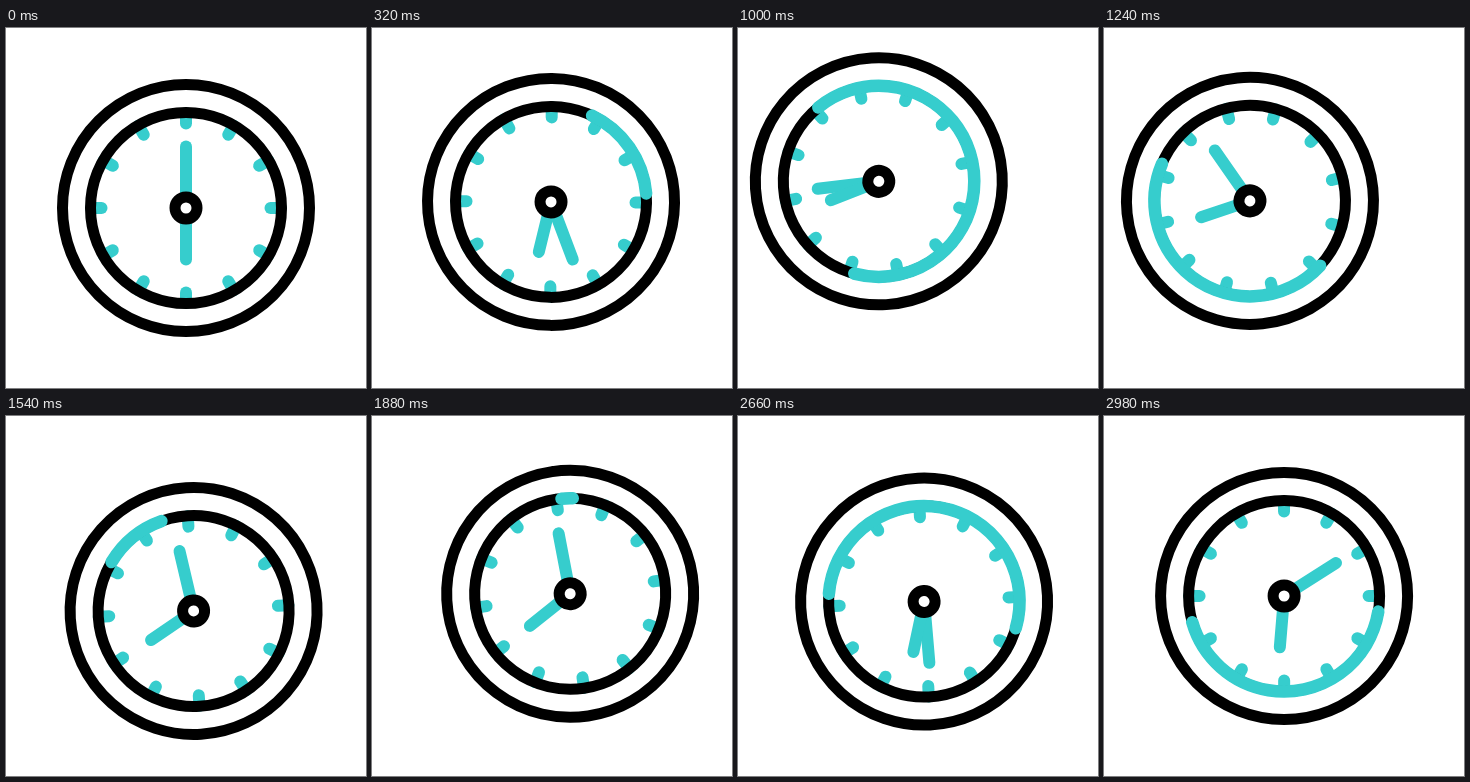
An HTML page with a canvas that plays this animation: 360x360 px, repeating every 3000 ms.

```html
<!DOCTYPE html>
<html lang="en">
<head>
<meta charset="utf-8">
<title>Clock</title>
<style>
  html, body { margin: 0; width: 100%; height: 100%; overflow: hidden; background: #fff; }
  canvas { display: block; width: 360px; height: 360px; }
</style>
</head>
<body>
<canvas id="stage" width="360" height="360"></canvas>
<script>
const ctx = document.getElementById('stage').getContext('2d');
const LOOP = 3000, STEP = 20, PHASE = 1800;
const TEAL = '#36cdcd', BLACK = '#000';
const RAD = Math.PI / 180, TURNS = 720;

const clamp = u => Math.min(1, Math.max(0, u));
const smooth = u => u * u * (3 - 2 * u);

// Timing curve cubic-bezier(x1, 0, x2, 1).
function ease(x1, x2) {
  return u => {
    let lo = 0, hi = 1;
    for (let i = 0; i < 24; i++) {
      const p = (lo + hi) / 2, q = 1 - p;
      if (3 * q * q * p * x1 + 3 * q * p * p * x2 + p * p * p < u) lo = p;
      else hi = p;
    }
    return smooth(lo);
  };
}

// Swing that rests at each [time, offset] turning point.
function swing(...keys) {
  return t => {
    let v = 0;
    keys.forEach(([time, offset], i) => {
      const [t0, v0] = keys[i - 1] || [0, 0];
      v += (offset - v0) * smooth(clamp((t - t0) / (time - t0)));
    });
    return v;
  };
}

const swayX = swing([240, 0], [1110, -41], [1750, 24], [2290, -16], [2710, 7], [3000, 0]);
const swayY = swing([30, 0], [970, -27], [1530, 15], [2050, -8], [2520, 8], [2900, 0]);

// The hands wind forward, then back; the highlight sweeps forward both times.
const phases = [
  { hand: ease(0.23, 0.25), head: ease(0.31, 0.42), tail: ease(0.58, 0.69) },
  { hand: ease(0.46, 0.16), head: ease(0.21, 0.46), tail: ease(0.38, 0.78) }
];

function arc(r, color, width, from = 0, to = 360) {
  ctx.strokeStyle = color;
  ctx.lineWidth = width;
  ctx.beginPath();
  ctx.arc(0, 0, r, (from - 90) * RAD, (to - 90) * RAD);
  ctx.stroke();
}

function spoke(deg, from, to) {
  const s = Math.sin(deg * RAD), c = -Math.cos(deg * RAD);
  ctx.strokeStyle = TEAL;
  ctx.lineWidth = 12;
  ctx.beginPath();
  ctx.moveTo(s * from, c * from);
  ctx.lineTo(s * to, c * to);
  ctx.stroke();
}

function draw(t) {
  const back = t >= PHASE;
  const { hand, head, tail } = phases[back ? 1 : 0];
  const u = (t % PHASE) / PHASE;
  const minute = TURNS * (back ? 1 - hand(u) : hand(u));
  const from = TURNS * tail(u), to = TURNS * head(u);
  const dx = swayX(t);

  ctx.setTransform(1, 0, 0, 1, 0, 0);
  ctx.fillStyle = '#fff';
  ctx.fillRect(0, 0, 360, 360);
  ctx.translate(180 + dx, 180 + swayY(t));
  ctx.rotate(-0.462 * dx * RAD);
  ctx.lineCap = 'round';

  for (let a = 0; a < 360; a += 30) spoke(a, 95, 84.5);
  arc(123.5, BLACK, 11);
  arc(95.5, BLACK, 11);
  if (to - from > 0.3) arc(95.5, TEAL, 12.5, from, to);

  spoke(minute, 0, 61.5);
  spoke(180 + minute / 12, 0, 51.5);
  ctx.beginPath();
  ctx.arc(0, 0, 11, 0, 2 * Math.PI);
  ctx.fill();
  arc(11, BLACK, 11);
}

const start = performance.now();
function frame() {
  const t = Math.max(0, performance.now() - start) % LOOP;
  draw(Math.floor(t / STEP) * STEP);
  requestAnimationFrame(frame);
}
frame();
</script>
</body>
</html>
```
